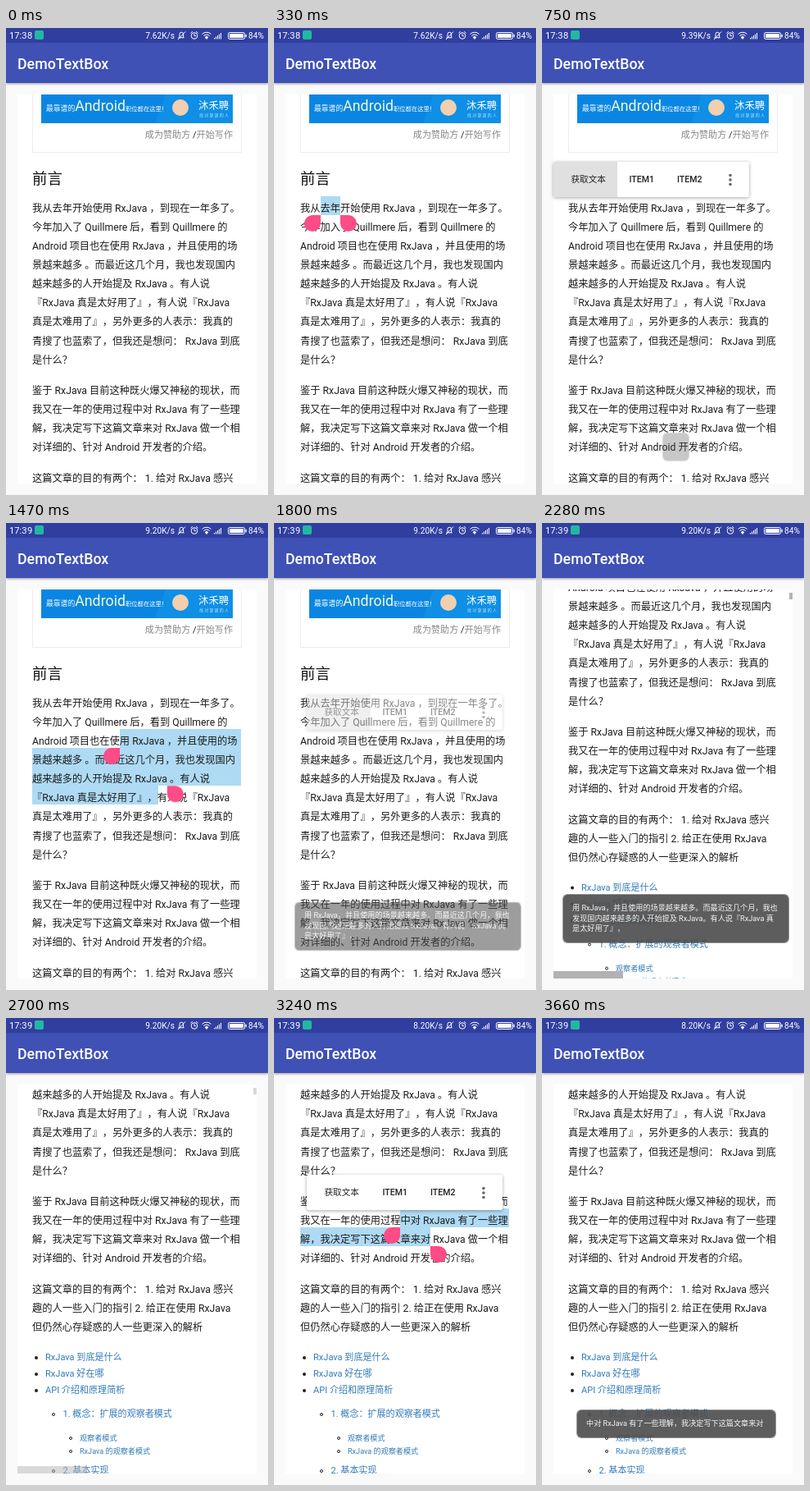
Write an HTML page that moves like this. It is 320x569 px and loops after 3.69 s.

```html
<!DOCTYPE html>
<html lang="zh-CN">
<head>
<meta charset="utf-8">
<title>Text selection demo</title>
<style>
html, body { margin: 0; width: 100%; height: 100%; overflow: hidden; background: #fafafa; }
body {
  position: relative;
  font-family: Roboto, "Noto Sans CJK SC", "Noto Sans CJK", sans-serif;
  text-spacing-trim: space-all;
  text-autospace: no-autospace;
  white-space: pre;
  color: #1c1c1c;
}
div, h1, h2, p, svg { position: absolute; margin: 0; font-weight: 400; }
.anim { animation: 3690ms linear infinite; }
.step { animation: 3690ms step-end infinite; }

/* Status bar and title */
.status { left: 0; top: 0; width: 320px; height: 18px; background: #303f9f; color: #fff; }
.time { left: 4px; top: 3px; font-size: 11.2px; line-height: 13px; }
.minute { left: 26px; top: 3px; height: 13px; overflow: hidden; width: 8px; font-size: 11.2px; line-height: 13px; }
.rate { left: 160px; top: 3px; width: 46px; height: 13px; overflow: hidden; font-size: 10.2px; line-height: 13px; text-align: right; }
.minute div { animation-name: minute; }
.rate div { right: 0; animation-name: rate; }
.app { left: 35px; top: 3px; width: 11px; height: 11px; border-radius: 2px; background: #22b8a0; }
.level { left: 296px; top: 3px; font-size: 10.2px; line-height: 13px; }
.bar { left: 0; top: 18px; width: 320px; height: 49px; background: #3f51b5; box-shadow: 0 1px 3px rgba(0,0,0,.4); }
.bar h1 { left: 14px; top: 14px; font-size: 17.8px; line-height: 24px; font-weight: 500; color: #fff; }

/* Scrolling page, in stage coordinates */
.view { left: 14px; top: 81px; width: 292px; height: 474px; background: #fff; overflow: hidden; }
.page { left: -14px; top: -81px; width: 320px; height: 900px; animation-name: scroll; }
.page p { left: 32px; font-size: 12.25px; line-height: 23.15px; }
.page h2 { left: 32px; top: 171.5px; font-size: 18.4px; line-height: 24px; color: #111; }
.frame { left: 32px; top: 60px; width: 254px; height: 90px; border: 1px solid #ececec; }
.banner { left: 43px; top: 74px; width: 234px; height: 42px; color: #fff; overflow: hidden;
  background: linear-gradient(110deg, #0a86e2 0 62%, #0f8fe6 62% 100%); }
.slogan { left: 6px; top: 8px; font-size: 8.8px; line-height: 26px; font-weight: 500; }
.slogan b { font-size: 17.8px; font-weight: 400; color: #f1fbd2; }
.slogan i { font-size: 7.3px; font-style: normal; }
.mascot { left: 160px; top: 13px; width: 20px; height: 20px; border-radius: 50%; background: #f2cfae; }
.brand { left: 192px; top: 13px; font-size: 12.4px; line-height: 16px; }
.tag { left: 193px; top: 28px; font-size: 5px; line-height: 8px; letter-spacing: 1.2px; opacity: .75; }
.links { right: 43px; top: 121px; font-size: 11.1px; line-height: 20px; color: #888; }
.links b { color: #222; font-weight: 400; }
.li { left: var(--x); top: calc(var(--y) - 9.5px); font-size: 11.05px; line-height: 20px; color: #337ab7; }
.li::before { content: ""; position: absolute; box-sizing: border-box; left: -13.5px; top: 8px; width: 4px; height: 4px; border-radius: 50%; background: #222; }
.ring::before { background: none; border: 1px solid #222; }
.small { font-size: 9.1px; }

/* Selection */
.sel { left: 32px; opacity: 0; }
.mark { left: 0; top: 0; width: 255px; height: 93px; background: #aedaf4; }
.grip { width: 20px; height: 20px; background: #ff4b86; }
.from { border-radius: 50% 0 50% 50%; margin-left: -20px; top: 23px; }
.to { border-radius: 0 50% 50% 50%; left: 0; top: 23px; }

.thumb { background: #b2b2b2; animation-name: thumb; }

/* Floating menu */
.menu { left: 14px; top: 163px; width: 239px; height: 43px; border-radius: 2px; background: #fff;
  box-shadow: 0 1px 4px rgba(0,0,0,.35); font-size: 10.6px; line-height: 43px; color: #222; animation-name: menu; }
.menu div { top: 0; font-weight: 500; }
.press { left: 0; width: 78px; height: 43px; background: #e0e0e0; animation-name: press; }

.toast { box-sizing: border-box; border: 1px solid rgba(76,76,76,.6); border-radius: 6px;
  background: rgba(76,76,76,.9) padding-box; color: #f4f4f4;
  font-size: 9.15px; line-height: 12.5px; padding: 10px 11px; }

@keyframes minute { 0% { transform: none } 36%, 100% { transform: translateY(-13px) } }
@keyframes rate {
  0% { transform: none }
  14.2% { transform: translateY(-13px) }
  36% { transform: translateY(-26px) }
  81%, 100% { transform: translateY(-39px) }
}
@keyframes scroll {
  0%, 51.4% { transform: none }
  61.79% { transform: translateY(-187px); animation-timing-function: cubic-bezier(.215,.61,.355,1) }
  67.05%, 100% { transform: translateY(-218px) }
}
@keyframes thumb {
  0%, 51.2% { opacity: 0 }
  51.3%, 70.73% { opacity: 1 }
  75.61%, 100% { opacity: 0 }
}
@keyframes menu {
  0%, 9.76% { opacity: 0; transform: none }
  12.2%, 21.14% { opacity: 1; transform: none }
  23.58% { opacity: 0; transform: none }
  42.68% { opacity: 0; transform: translate(26px,46px) }
  44.31%, 47.97% { opacity: 1; transform: translate(26px,46px) }
  49.59% { opacity: 0; transform: translate(26px,46px) }
  85.37% { opacity: 0; transform: translate(26px,28px) }
  87.4%, 94.31% { opacity: 1; transform: translate(26px,28px) }
  96.34%, 100% { opacity: 0; transform: translate(26px,28px) }
}
@keyframes press {
  0%, 23.58%, 49.59%, 96.34%, 100% { opacity: 0 }
  16.67%, 45.53%, 91.06% { opacity: 1 }
}
@keyframes show1 { 0%, 19.1%, 100% { opacity: 0 } 4.07% { opacity: 1 } }
@keyframes show2 { 0%, 46.75%, 100% { opacity: 0 } 32.11% { opacity: 1 } }
@keyframes show3 { 0%, 93.09%, 100% { opacity: 0 } 75.2% { opacity: 1 } }
@keyframes mark2 {
  0% { clip-path: polygon(107px 0, 119px 0, 119px 23px, 119px 23px, 119px 23px, 107px 23px, 107px 23px, 107px 23px) }
  34.15% { clip-path: polygon(107px 0, 180px 0, 180px 23px, 180px 23px, 180px 23px, 107px 23px, 107px 23px, 107px 23px) }
  35.77% { clip-path: polygon(107px 0, 255px 0, 255px 23px, 173px 23px, 173px 46px, 0 46px, 0 23px, 107px 23px) }
  37.4% { clip-path: polygon(107px 0, 255px 0, 255px 46px, 168px 46px, 168px 69px, 0 69px, 0 23px, 107px 23px) }
  39.02%, 100% { clip-path: polygon(107px 0, 255px 0, 255px 69px, 154px 69px, 154px 92px, 0 92px, 0 23px, 107px 23px) }
}
@keyframes mark3 {
  0% { clip-path: polygon(122px 0, 135px 0, 135px 23px, 135px 23px, 135px 23px, 122px 23px, 122px 23px, 122px 23px) }
  78.05% { clip-path: polygon(122px 0, 193px 0, 193px 23px, 193px 23px, 193px 23px, 122px 23px, 122px 23px, 122px 23px) }
  80.49% { clip-path: polygon(122px 0, 255px 0, 255px 23px, 135px 23px, 135px 46px, 0 46px, 0 23px, 122px 23px) }
  82.93%, 100% { clip-path: polygon(122px 0, 255px 0, 255px 23px, 159px 23px, 159px 46px, 0 46px, 0 23px, 122px 23px) }
}
@keyframes to2 {
  0%, 32.93% { transform: translate(119px,0) }
  34.96% { transform: translate(180px,0) }
  39.84% { transform: translate(165px,46px) }
  41.87%, 100% { transform: translate(154px,69px) }
}
@keyframes to3 {
  0%, 76.02% { transform: translate(135px,0) }
  78.46% { transform: translate(198px,0) }
  83.74%, 100% { transform: translate(159px,23px) }
}
@keyframes toast1 {
  0%, 18.7% { opacity: 0; transform: translateY(24px) }
  23.58%, 32.52% { opacity: 1; transform: none }
  34.96%, 100% { opacity: 0; transform: none }
}
@keyframes toast2 {
  0%, 46.34% { opacity: 0; transform: translateY(24px) }
  50.41%, 65.85% { opacity: 1; transform: none }
  68.29%, 100% { opacity: 0; transform: none }
}
@keyframes toast3 {
  0%, 93.5% { opacity: 0; transform: translateY(24px) }
  97.56%, 100% { opacity: 1; transform: none }
}
</style>
</head>
<body>
<div class="view">
  <div class="page anim">
    <div class="frame"></div>
    <div class="banner">
      <div class="slogan">最靠谱的<b>Android</b><i>职位都在这里！</i></div>
      <div class="mascot"></div>
      <div class="brand">沐禾聘</div>
      <div class="tag">找对靠谱的人</div>
    </div>
    <div class="links">成为赞助方 <b>/</b>开始写作</div>

    <div class="sel step" style="top:205px;animation-name:show1">
      <div class="mark" style="left:24.5px;width:24.5px;height:23px"></div>
    </div>
    <div class="sel step" style="top:251px;animation-name:show2">
      <div class="mark step" style="animation-name:mark2"></div>
    </div>
    <div class="sel step" style="top:450px;animation-name:show3">
      <div class="mark step" style="animation-name:mark3"></div>
    </div>

    <h2>前言</h2>
    <p style="top:208.5px">我从去年开始使用 RxJava ，到现在一年多了。
今年加入了 Quillmere 后，看到 Quillmere 的
Android 项目也在使用 RxJava ，并且使用的场
景越来越多 。而最近这几个月，我也发现国内
越来越多的人开始提及 RxJava 。有人说
『RxJava 真是太好用了』，有人说『RxJava
真是太难用了』，另外更多的人表示：我真的
青搜了也蓝索了，但我还是想问： RxJava 到底
是什么？</p>
    <p style="top:431px">鉴于 RxJava 目前这种既火爆又神秘的现状，而
我又在一年的使用过程中对 RxJava 有了一些理
解，我决定写下这篇文章来对 RxJava 做一个相
对详细的、针对 Android 开发者的介绍。</p>
    <p style="top:538px">这篇文章的目的有两个： 1. 给对 RxJava 感兴
趣的人一些入门的指引 2. 给正在使用 RxJava
但仍然心存疑惑的人一些更深入的解析</p>
    <div class="li" style="--x:48px;--y:631.5px">RxJava 到底是什么</div>
    <div class="li" style="--x:48px;--y:651.5px">RxJava 好在哪</div>
    <div class="li" style="--x:48px;--y:671.5px">API 介绍和原理简析</div>
    <div class="li ring" style="--x:69.5px;--y:700.5px">1. 概念：扩展的观察者模式</div>
    <div class="li ring small" style="--x:90px;--y:729.5px">观察者模式</div>
    <div class="li ring small" style="--x:90px;--y:745.5px">RxJava 的观察者模式</div>
    <div class="li ring" style="--x:69.5px;--y:769.5px">2. 基本实现</div>

    <div class="sel step" style="top:205px;animation-name:show1">
      <div class="grip from" style="left:24.5px"></div>
      <div class="grip to" style="left:49px"></div>
    </div>
    <div class="sel step" style="top:251px;animation-name:show2">
      <div class="grip from" style="left:107px"></div>
      <div class="grip to anim" style="animation-name:to2"></div>
    </div>
    <div class="sel step" style="top:450px;animation-name:show3">
      <div class="grip from" style="left:122px"></div>
      <div class="grip to anim" style="animation-name:to3"></div>
    </div>
  </div>
  <div class="thumb anim" style="left:288px;top:3.5px;width:4px;height:8px"></div>
  <div class="thumb anim" style="left:0;top:465px;width:85px;height:9px"></div>
</div>

<div class="bar"><h1>DemoTextBox</h1></div>
<div class="status">
  <div class="time">17:3</div>
  <div class="minute"><div class="step">8
9</div></div>
  <div class="app"></div>
  <div class="rate"><div class="step">7.62K/s
9.39K/s
9.20K/s
8.20K/s</div></div>
  <svg style="left:208px;top:0" width="88" height="18" fill="none" stroke="#fff">
    <path d="M4 11.5V7.5a2.3 2.3 0 0 1 4.6 0V11.5M2.5 11.8H9.6M2 14 11 4.5"/>
    <circle cx="22" cy="9.5" r="3.8"/>
    <path d="M22 7.2V9.7H24M17.5 6.2 19.8 4.3M26.5 6.2 24.2 4.3"/>
    <path d="M31.5 7.4a8 8 0 0 1 11 0M33.4 9.5a5.2 5.2 0 0 1 7.2 0"/>
    <path d="M37 14 34.8 11.3a3 3 0 0 1 4.4 0Z" fill="#fff" stroke="none"/>
    <path d="M46.5 13.5V12M48.5 13.5V10.5M50.5 13.5V9M52.5 13.5V7.5M54.5 13.5V6"/>
    <rect x="63.5" y="5.5" width="20" height="8" rx="1.8"/>
    <path d="M65 7H82V12H65ZM84.5 7.8H85.8V11.2H84.5Z" fill="#fff" stroke="none"/>
  </svg>
  <div class="level">84%</div>
</div>

<div class="menu anim">
  <div class="press step"></div>
  <div style="left:21.5px">获取文本</div>
  <div style="left:92.5px">ITEM1</div>
  <div style="left:151px">ITEM2</div>
  <svg style="left:212px;top:14px" width="8" height="18" fill="#666">
    <circle cx="4" cy="2.5" r="1.8"/><circle cx="4" cy="8" r="1.8"/><circle cx="4" cy="13.5" r="1.8"/>
  </svg>
</div>

<div class="toast anim" style="left:147px;top:477px;width:33px;height:35px;animation-name:toast1"></div>
<div class="toast anim" style="left:25px;top:452px;width:277px;height:60px;animation-name:toast2">用 RxJava，并且使用的场景越来越多。而最近这几个月，我也
发现国内越来越多的人开始提及 RxJava。有人说『RxJava 真
是太好用了』，</div>
<div class="toast anim" style="left:42px;top:477px;width:244px;height:35px;animation-name:toast3">中对 RxJava 有了一些理解，我决定写下这篇文章来对</div>
</body>
</html>
```
